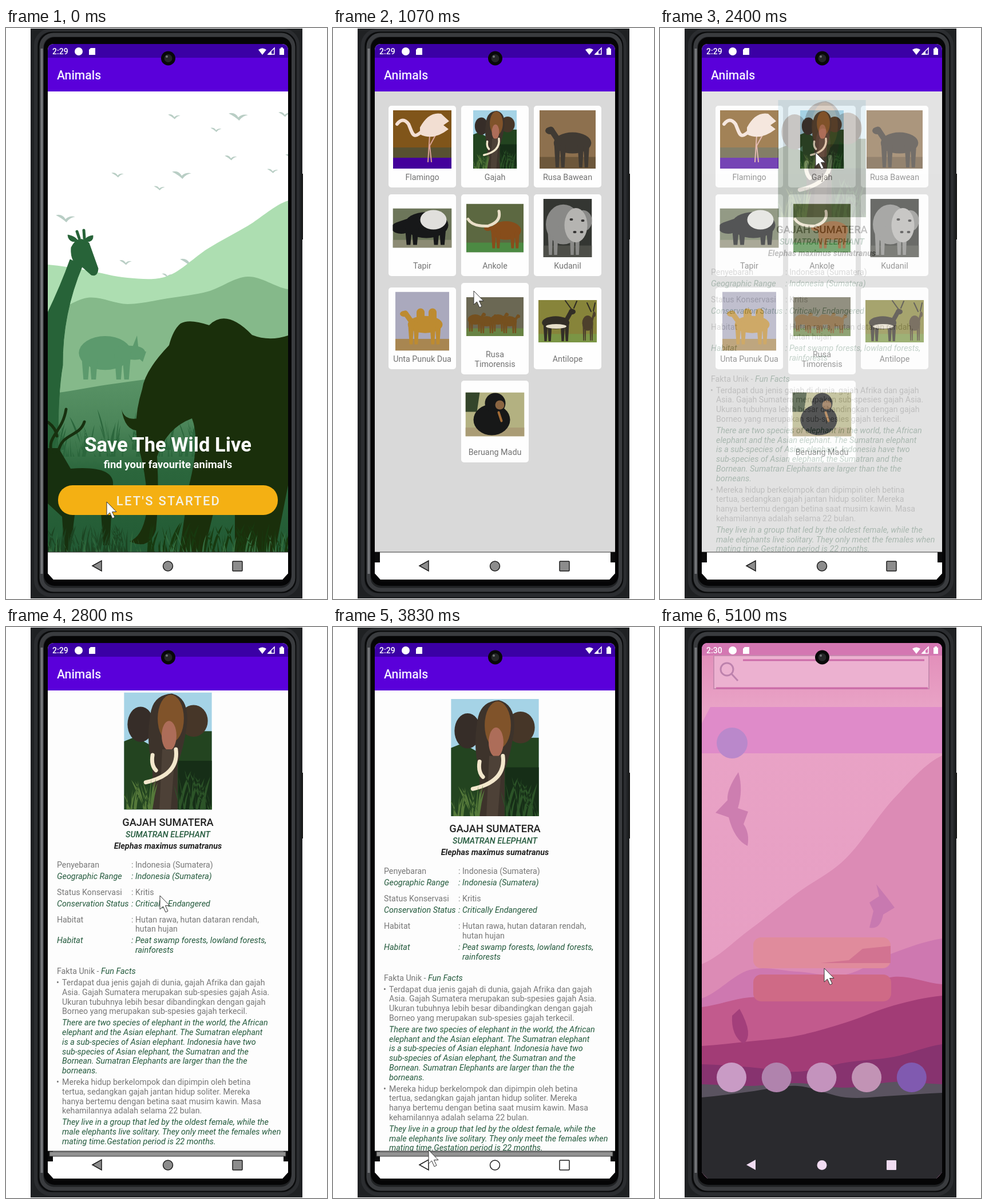
An HTML page that plays this animation: 561 by 999 pixels, repeating every 5130 ms.

```html
<!DOCTYPE html>
<html lang="en">
<head>
<meta charset="utf-8">
<title>Animals</title>
<style>
html,body{margin:0;width:100%;height:100%;overflow:hidden;background:#fff}
svg{display:block;width:100vw;height:100vh;font-family:Roboto,sans-serif}
.mid,.label{text-anchor:middle}
.label{font-size:14.3px;fill:#727272}
.id{font-size:14.2px;fill:#777}
.en{font-size:14.4px;fill:#245a3d;font-style:italic}
.strong{font-weight:500}
</style>
</head>
<body>
<svg viewBox="0 0 561 999" preserveAspectRatio="none">
<defs>
  <clipPath id="screen"><path d="M84 28H482Q493 28 493 40V954L483 965H83L73 954V40Q73 28 84 28Z"/></clipPath>
  <clipPath id="page"><rect x="72" y="111" width="421" height="806"/></clipPath>
  <linearGradient id="ground" x1="0" y1="600" x2="0" y2="917" gradientUnits="userSpaceOnUse">
    <stop offset="0" stop-color="#5b9568"/><stop offset=".3" stop-color="#4b8559"/>
    <stop offset=".55" stop-color="#2b663c"/><stop offset="1" stop-color="#225a34"/>
  </linearGradient>
  <linearGradient id="sky" x1="0" y1="0" x2="0" y2="1">
    <stop offset="0" stop-color="#e18bb8"/><stop offset=".12" stop-color="#e9a3c6"/><stop offset="1" stop-color="#e59bc1"/>
  </linearGradient>
  <path id="bird" d="M-12-4Q-4-6 0 1Q5-4 12-2Q5-1 1 5Q-4 0-12-4Z" fill="#b9cec5"/>
  <symbol id="elephant" viewBox="0 0 154 206">
    <rect width="154" height="206" fill="#a5d3e6"/>
    <path d="M0 86L20 78L45 92L110 68H154V206H0Z" fill="#234420"/>
    <path d="M95 120H154V206H95Z" fill="#162e17"/>
    <ellipse cx="29" cy="56" rx="23" ry="31" fill="#362d28"/>
    <ellipse cx="122" cy="50" rx="25" ry="28" fill="#463628"/>
    <path d="M46 40Q50 4 84 2Q116 10 110 60Q104 100 94 125V206H50V125Q38 90 46 40Z" fill="#3d332b"/>
    <ellipse cx="82" cy="46" rx="23" ry="42" fill="#80532a"/>
    <ellipse cx="79" cy="76" rx="13" ry="26" fill="#ad6d59"/>
    <path d="M67 100L62 206H82L90 100Z" fill="#4d4137"/>
    <path d="M50 110Q47 128 56 137M91 100Q97 145 38 158" fill="none" stroke="#f3e7cc" stroke-width="7" stroke-linecap="round"/>
    <g id="reeds"></g>
  </symbol>
</defs>

<rect x="43" y="1" width="475" height="997" fill="#1f2123"/>
<g fill="none">
  <rect x="52" y="4" width="458" height="988" rx="26" stroke="#2b2d30" stroke-width="6"/>
  <rect x="57" y="8" width="449" height="979" rx="24" stroke="#090a0b" stroke-width="3"/>
  <rect x="62" y="12" width="440" height="971" rx="21" stroke="#3a3c3f" stroke-width="7"/>
  <path d="M62.500 36V955" stroke="#75777a" stroke-width="4"/>
  <path d="M518 255V370" stroke="#111" stroke-width="2"/>
</g>
<rect x="66" y="16" width="433" height="960" rx="19" fill="#050506"/>

<g clip-path="url(#screen)">
  <rect x="72" y="28" width="421" height="940" fill="#fff"/>

  <g id="splash" clip-path="url(#page)">
    <g id="land"></g>
    <g id="rhino"></g>
    <g id="meadow"></g>
    <g fill="#276338" stroke="#276338">
      <path d="M72 500Q96 450 112 405L134 415Q98 500 99 590Q90 640 91 740H72Z"/>
      <path d="M114 384Q126 360 145 376L161 421Q160 436 149 432L131 416Q112 412 114 384Z"/>
      <path d="M121 374Q109 374 108 362Q120 364 126 372ZM141 374Q153 374 152 363Q142 364 137 371Z"/>
      <path d="M128 368L124 356M137 368L136 354" stroke-width="5" stroke-linecap="round"/>
    </g>
    <g id="tufts"></g>
    <g fill="#1a2f0b">
      <path d="M493 538Q460 549 430 537Q385 490 355 520Q320 508 305 517Q292 528 285 555Q242 600 238 632Q220 690 232 735Q250 800 245 850Q238 890 216 898Q250 915 262 878Q268 820 264 750Q280 700 325 683Q340 720 320 800L303 917H346L362 850Q380 800 400 850V917H470L493 800Z"/>
      <path d="M202 667Q207 689 236 682V704Q208 708 202 667Z"/>
    </g>
    <g fill="#17300f">
      <path d="M60 735H92L113 771Q190 765 187 800L181 905H170L166 848Q140 838 120 852L112 917H102L98 855L60 820Z"/>
      <path d="M80 743C70 715 99 707 105 667M91 743C97 707 128 717 137 689M74 690Q87 700 89 714" fill="none" stroke="#17300f" stroke-width="5" stroke-linecap="round"/>
    </g>
    <g id="grass"></g>
    <g class="mid" fill="#fff" font-weight="700">
      <text x="283" y="741" font-size="34.600">Save The Wild Live</text>
      <text x="283" y="770" font-size="18.500">find your favourite animal's</text>
    </g>
    <rect x="91" y="800" width="384" height="52" rx="25" fill="#f4b013"/>
    <text x="284" y="835" class="mid" font-size="22" font-weight="500" letter-spacing="2.2" fill="#f4f1e4">LET'S STARTED</text>
  </g>

  <g id="grid" clip-path="url(#page)"><rect x="72" y="111" width="421" height="806" fill="#d9d9d9"/></g>

  <g id="detail" clip-path="url(#page)">
    <rect x="72" y="111" width="421" height="806" fill="#fdfdfd"/>
    <g id="sheet">
      <use href="#elephant" x="206" y="126" width="154" height="205"/>
      <g class="mid">
        <text x="283" y="359" font-size="18.300" font-weight="500" fill="#222">GAJAH SUMATERA</text>
        <text x="283" y="379" class="en strong">SUMATRAN ELEPHANT</text>
        <text x="283" y="399" font-size="14.400" font-weight="700" font-style="italic" fill="#222">Elephas maximus sumatranus</text>
      </g>
    </g>
  </g>

  <rect x="72" y="28" width="421" height="25" fill="#3b00a5"/>
  <rect x="72" y="52" width="421" height="59" fill="#5a00da"/>
  <text x="89" y="90" font-size="21.200" font-weight="500" fill="#f4f0ff">Animals</text>
  <path d="M72 917H493V967H72Z" fill="#fff"/><path d="M72 917H493" stroke="#333"/>
  <path id="notch" d="M72 917H82V935H72ZM485 917H493V935H485Z" fill="#0b0b0c"/>
  <path id="shade" d="M76 918H489V926H76Z" fill="#929292" stroke="#333"/>
  <g id="pressed"><path d="M80 920H485V943H80Z" fill="#8b8b8b"/><path d="M72 920H493M72 943H493" stroke="#222"/>
    <rect x="107" y="919" width="108" height="47" rx="20" fill="#050706"/></g>

  <g id="home">
    <rect x="72" y="28" width="421" height="940" fill="url(#sky)"/>
    <g id="dunes"></g>
    <path d="M88 140H493V221H72V170Z" fill="#df8bc9"/>
    <g fill="#cd7eb0">
      <path id="hawk" d="M137 254Q116 285 118 303L97 325L120 333Q130 372 153 383Q157 360 146 345L154 323L136 317Q146 285 137 254Z"/>
      <use href="#hawk" transform="translate(480 246) scale(-.8)" transform-origin="0 250" fill="#c879b0" display="none"/>
      <path d="M378 450L383 471L366 482L373 497L366 526Q385 530 390 503L410 491L398 475Z" fill="#c879b0"/>
    </g>
    <path d="M126 680Q124 715 146 729Q165 715 139 668Z" fill="#a33f7b"/>
    <g id="tiles"><rect x="163" y="543" width="240" height="54" rx="14" fill="#e08b9c"/>
      <path d="M280 588L330 583L354 563L403 558V588Z" fill="#d27391"/>
      <rect x="163" y="608" width="241" height="47" rx="14" fill="#cf6a86"/></g>
    <rect x="72" y="28" width="421" height="22" fill="#d477b2"/>
    <path d="M94 50H470V108H94Z" fill="#ecb1d0" stroke="#c78aaf" stroke-width="2"/>
    <path d="M145 58H462M98 107H468" stroke="#cc6ba8" stroke-width="3"/>
    <path d="M125 82L136 94M106 74A11 11 0 1 1 128 74A11 11 0 1 1 106 74" fill="none" stroke="#bd82ad" stroke-width="3"/>
    <circle cx="126" cy="203" r="27" fill="#ba88cb"/>
    <g id="dock"></g>
  </g>

  <g id="nav" stroke-width="1.500"><path d="M151 941L167 932V950Z"/><circle cx="283" cy="941.500" r="8.500"/><rect x="396" y="933" width="17" height="17" rx="1"/></g>
  <g fill="#fff">
    <text id="clock" x="81" y="46" font-size="14" font-weight="500"></text>
    <circle cx="127" cy="41" r="7"/>
    <path d="M148 35H156V47H145V38ZM441 38Q448 33 455 38L448 47ZM478 36H480V34H484V36H486V47H478Z"/>
    <path d="M458 46L469 35V46Z" fill="none" stroke="#fff" stroke-width="1.500"/><path d="M458 47L464 41V47Z"/>
  </g>
</g>
<circle cx="283.500" cy="53" r="12.500" fill="#080909"/><circle cx="283.500" cy="53" r="7" fill="#242627"/><circle cx="281" cy="50" r="2" fill="#717576"/>
<path id="cursor" d="M0 0V24L5.500 19L10 29L14 27L9.500 17.500H17Z" fill="#fff" stroke="#333"/>
</svg>
<script>
const LOOP = 5130;
const NS = 'http://www.w3.org/2000/svg';
const $ = id => document.getElementById(id);
const clamp = v => Math.max(0, Math.min(1, v));
const ease = v => v * v * (3 - 2 * v);
const ramp = (t, start, length) => ease(clamp((t - start) / length));

let seed = 7;
const rnd = () => (seed = seed * 16807 % 2147483647) / 2147483647;

function add(parent, tag, attrs, text) {
  const el = document.createElementNS(NS, tag);
  for (const key in attrs) el.setAttribute(key, attrs[key]);
  if (text) el.textContent = text;
  parent.append(el);
  return el;
}

// Evenly spaced heights across the screen, joined by a smooth ridge.
function hill(parent, fill, ...ys) {
  const step = 421 / (ys.length - 1), last = ys.length - 1;
  const slope = i => (ys[Math.min(i + 1, last)] - ys[Math.max(i - 1, 0)]) / 6;
  let d = `M72 968V${ys[0]}`;
  for (let i = 0; i < last; i++) {
    const x = 72 + i * step;
    d += `C${x + step / 3} ${ys[i] + slope(i)} ${x + step * 2 / 3} ${ys[i + 1] - slope(i + 1)} ${x + step} ${ys[i + 1]}`;
  }
  add(parent, 'path', {d: d + 'V968Z', fill});
}

function blades(parent, n, x0, x1, y, height, fill) {
  let d = '';
  for (let i = 0; i < n; i++) {
    const x = x0 + rnd() * (x1 - x0), h = height * (.35 + rnd() * .65), lean = (rnd() - .5) * h * .8;
    d += `M${x} ${y}Q${x + lean * .2} ${y - h * .6} ${x + lean} ${y - h}Q${x + lean * .5} ${y - h * .5} ${x + 3} ${y}`;
  }
  add(parent, 'path', {d, fill});
}

// A four-legged animal filling the box w by h; it looks right unless flipped.
function beast(parent, x, y, w, h, fill, {flip = false, head = .15, bulk = .25, neck = .13} = {}) {
  const g = add(parent, 'g', {fill, transform: `translate(${flip ? x + w : x} ${y}) scale(${flip ? -w : w} ${h})`});
  add(g, 'ellipse', {cx: .42, cy: .42, rx: .4, ry: bulk});
  for (const lx of [.08, .2, .58, .7]) add(g, 'path', {d: `M${lx - .02} .45h.13l-.03 .55h-.07z`});
  add(g, 'path', {d: `M.7 .4L.88 ${head}`, stroke: fill, 'stroke-width': neck, 'stroke-linecap': 'round'});
  add(g, 'ellipse', {cx: .9, cy: head + .03, rx: .1, ry: .085});
  return g;
}

// Welcome page
hill($('land'), '#addeb1', 414, 424, 437, 434, 386, 346, 302);
hill($('land'), '#85b98a', 502, 472, 483, 473, 461, 435, 457);
hill($('meadow'), 'url(#ground)', 640, 624, 610, 600, 600);
const flocks = [[0, 0], [-99, 102], [99, 72], [-302, 178], [-85, 255], [193, -4]];
for (const [dx, dy] of flocks)
  [[294, 155, .9], [367, 178, .8], [406, 155, 1.4]].forEach(([x, y, s]) =>
    $('land').prepend(add($('land'), 'use', {href: '#bird', transform: `translate(${x + dx} ${y + dy}) scale(${s})`})));
beast($('rhino'), 125, 535, 115, 80, '#5c9a6d', {head: .42, bulk: .37, neck: .3});
add($('rhino'), 'path', {d: 'M218 566L229 538L232 566L245 566L239 584Z', fill: '#5c9a6d'});
for (let x = 92; x < 335; x += 46) blades($('tufts'), 10, x - 10, x + 10, 738, 50 + rnd() * 35, '#2b663c');
blades($('tufts'), 45, 72, 335, 750, 38, '#2b663c');
blades($('grass'), 75, 72, 215, 918, 52, '#1c4422');
blades($('grass'), 90, 245, 493, 918, 55, '#17390f');
blades($('grass'), 45, 72, 493, 918, 40, '#326c3d');
blades($('reeds'), 22, 0, 50, 206, 60, '#55793a');
blades($('reeds'), 22, 95, 154, 206, 70, '#2c5428');

// Cards: label, photo size, far and near tones, painter
const horns = (g, d, stroke, width = 2) => add(g, 'path', {d, stroke, 'stroke-width': width, fill: 'none', 'stroke-linecap': 'round'});
const cards = [
  ['Flamingo', 102, 102, '#80551a', '#44009b', g => {
    add(g, 'rect', {y: 65, width: 102, height: 18, fill: '#575031'});
    horns(g, 'M64 44L61 90M75 42L64 62L67 90', '#d9a296');
    horns(g, 'M57 30C34 55 35 42 27 24Q17 11 7 24', '#f3dfd3', 6);
    add(g, 'path', {d: 'M47 30Q62 2 84 6L98 19L88 26L97 33Q70 54 47 42Z', fill: '#f2ded2'});
  }],
  ['Gajah', 77, 102, '', '', g => add(g, 'use', {href: '#elephant', width: 77, height: 102})],
  ['Rusa Bawean', 98, 102, '#8d704e', '#6d573b', g => beast(g, 10, 26, 82, 74, '#403a33', {flip: true, head: .1})],
  ['Tapir', 103, 69, '#6d765a', '#8c8b74', g => {
    beast(g, 3, 4, 96, 60, '#171819', {flip: true, head: .5, bulk: .38, neck: .35});
    add(g, 'ellipse', {cx: 71, cy: 20, rx: 23, ry: 17, fill: '#e0dfdc'});
  }],
  ['Ankole', 100, 85, '#5c6841', '#4c8a43', g => {
    beast(g, 31, 24, 66, 54, '#874d1b', {flip: true, head: .32, bulk: .3});
    horns(g, 'M38 39Q11 40 3 27M40 38Q61 31 57 13', '#eadfc8', 5);
  }],
  ['Kudanil', 85, 102, '#343632', '#4d4e48', g => {
    beast(g, 3, 6, 76, 92, '#898987', {head: .35, bulk: .38, neck: .4});
    add(g, 'ellipse', {cx: 57, cy: 46, rx: 20, ry: 30, fill: '#b5b4b1'});
    horns(g, 'M48 36h2M68 38h2M54 58h2M66 58h2', '#363534', 4);
  }],
  ['Unta Punuk Dua', 94, 103, '#aaa9bd', '#a88651', g => {
    beast(g, 8, 32, 76, 60, '#bd8b30', {flip: true, head: .08});
    horns(g, 'M44 50V36M65 50V36', '#bd8b30', 14);
  }],
  ['Rusa|Timorensis', 100, 68, '#6b6854', '#688344', g => {
    for (let i = 0; i < 4; i++) beast(g, i * 20 + 2, 24 + i % 2 * 3, 32, 36, '#75501f');
  }],
  ['Antilope', 102, 74, '#87843a', '#7b9545', g => {
    beast(g, 5, 16, 60, 56, '#332e26', {head: .05, bulk: .2});
    add(g, 'ellipse', {cx: 31, cy: 46, rx: 18, ry: 4, fill: '#e6dec9'});
    beast(g, 76, 18, 24, 53, '#4d402c', {head: .1});
    horns(g, 'M57 15L47 1M62 14L67 2M92 20L85 5M96 19L99 5', '#302c25');
  }],
  ['Beruang Madu', 103, 77, '#b3b181', '#aa9c75', g => {
    add(g, 'path', {d: 'M0 0H25L20 34H0Z', fill: '#34452a'});
    add(g, 'ellipse', {cx: 46, cy: 48, rx: 32, ry: 27, fill: '#171818'});
    add(g, 'circle', {cx: 52, cy: 19, r: 18, fill: '#171818'});
    add(g, 'circle', {cx: 60, cy: 22, r: 8, fill: '#8b6541'});
    horns(g, 'M58 35L63 50', '#a46c36', 4);
  }],
];
cards.forEach(([label, w, h, far, near, paint], i) => {
  const row = Math.floor(i / 3), col = row < 3 ? i % 3 : 1;
  const lines = label.split('|'), extra = lines.length - 1;
  const x = 97 + 127 * col, y = 136 + 155 * row + 8 * Math.max(0, row - 1) - 8 * extra, tall = 143 + 17 * extra;
  add($('grid'), 'rect', {x, y, width: 118, height: tall, rx: 5, fill: '#fefefe'});
  const photo = add($('grid'), 'svg', {x: x + 59 - w / 2, y: y + 59 - h / 2, width: w, height: h, style: `width:${w}px;height:${h}px`});
  add(photo, 'rect', {width: w, height: h, fill: far || 'none'});
  add(photo, 'rect', {y: h * .8, width: w, height: h * .2, fill: near || 'none'});
  paint(photo);
  lines.forEach((s, k) => add($('grid'), 'text', {x: x + 59, y: y + tall - 13 - (extra - k) * 17, class: 'label'}, s));
});

// Detail text flows down from one running baseline.
const LINE = 16.75;
let base = 432;
const put = (cls, x, y, s) => add($('sheet'), 'text', {class: cls, x, y}, s);
function block(cls, x, text, gap = 20) {
  const lines = text.split('|');
  lines.forEach((s, i) => put(cls, x, base + i * LINE, s));
  base += (lines.length - 1) * LINE + gap;
}
function row(cls, name, value, gap) {
  put(cls, 89, base, name);
  put(cls, 219, base, ':');
  block(cls, 226, value, gap);
}
function fact(id, en) {
  put('id', 88, base, '•');
  block('id', 98, id);
  block('en', 98, en);
}
row('id', 'Penyebaran', 'Indonesia (Sumatera)');
row('en', 'Geographic Range', 'Indonesia (Sumatera)', 28);
row('id', 'Status Konservasi', 'Kritis');
row('en', 'Conservation Status', 'Critically Endangered', 28);
row('id', 'Habitat', 'Hutan rawa, hutan dataran rendah,|hutan hujan');
row('en', 'Habitat', 'Peat swamp forests, lowland forests,|rainforests', 37);
add(put('id', 89, base, 'Fakta Unik - '), 'tspan', {class: 'en'}, 'Fun Facts');
base += 20;
fact('Terdapat dua jenis gajah di dunia, gajah Afrika dan gajah|Asia. Gajah Sumatera merupakan sub-spesies gajah Asia.|Ukuran tubuhnya lebih besar dibandingkan dengan gajah|Borneo yang merupakan sub-spesies gajah terkecil.',
  'There are two species of elephant in the world, the African|elephant and the Asian elephant. The Sumatran elephant|is a sub-species of Asian elephant. Indonesia have two|sub-species of Asian elephant, the Sumatran and the|Bornean. Sumatran Elephants are larger than the the|borneans.');
fact('Mereka hidup berkelompok dan dipimpin oleh betina|tertua, sedangkan gajah jantan hidup soliter. Mereka|hanya bertemu dengan betina saat musim kawin. Masa|kehamilannya adalah selama 22 bulan.',
  'They live in a group that led by the oldest female, while the|male elephants live solitary. They only meet the females when|mating time.Gestation period is 22 months.');

// Launcher
hill($('dunes'), '#dc8bb5', 590, 530, 465, 405, 300, 225);
hill($('dunes'), '#ce78b0', 650, 600, 603, 608, 570, 545);
hill($('dunes'), '#c25a8d', 665, 648, 650, 640, 612, 625);
hill($('dunes'), '#a23c76', 733, 725, 715, 692, 662, 645);
hill($('dunes'), '#87336f', 765, 770, 778, 762, 752, 730);
hill($('dunes'), '#5a5360', 800, 803, 798, 806, 796, 800);
hill($('dunes'), '#2a2a2e', 823, 813, 803, 823, 820, 815);
['#c99bc5', '#b083ad', '#c493bd', '#c293b5', '#805ab0'].forEach((fill, i) =>
  add($('dock'), 'circle', {cx: 125 + i * 78.7, cy: 788, r: 26, fill}));

// Pointer stops: arrive, leave, x, y
const stops = [
  [0, 330, 176, 829], [1000, 1630, 246, 460], [2070, 2070, 246, 342], [2230, 2360, 272, 210],
  [2760, 3000, 269, 470], [3450, 3690, 240, 700], [3830, 3860, 167, 915], [3960, 4860, 165, 938], [5090, LOOP, 287, 597],
];
function pointer(t) {
  const i = stops.findLastIndex(s => s[0] <= t), [, leave, x, y] = stops[i];
  if (t <= leave) return [x, y];
  const [arrive, , x2, y2] = stops[i + 1], f = ramp(t, leave, arrive - leave);
  return [x + (x2 - x) * f, y + (y2 - y) * f];
}

function fade(id, alpha) {
  $(id).setAttribute('opacity', alpha);
  $(id).setAttribute('display', alpha > 0 ? 'inline' : 'none');
}

function draw(t) {
  const home = ramp(t, 4920, 150);
  const grid = ramp(t, 600, 180) - ramp(t, 4660, 120);
  const detail = ramp(t, 2350, 150) - ramp(t, 4080, 150);
  fade('grid', grid);
  fade('detail', detail);
  fade('home', home);
  fade('notch', grid > .5 && t < 4100 ? 1 : 0);
  fade('shade', detail > .5 ? 1 : 0);
  fade('pressed', ramp(t, 4080, 100) - ramp(t, 4860, 80));
  const scroll = ramp(t, 2640, 140) - ramp(t, 3000, 200);
  $('sheet').setAttribute('transform', `translate(0 ${-11.5 * scroll})`);
  $('nav').setAttribute('fill', home > .5 ? '#f1dcf2' : t > 3770 ? '#fff' : '#8c8c8c');
  $('nav').setAttribute('stroke', home > .5 ? 'none' : '#1b1b1b');
  $('clock').textContent = t < 4200 ? '2:29' : '2:30';
  $('cursor').setAttribute('transform', `translate(${pointer(t)})`);
}

function tick() {
  draw(performance.now() % LOOP);
  requestAnimationFrame(tick);
}
tick();
</script>
</body>
</html>
```
